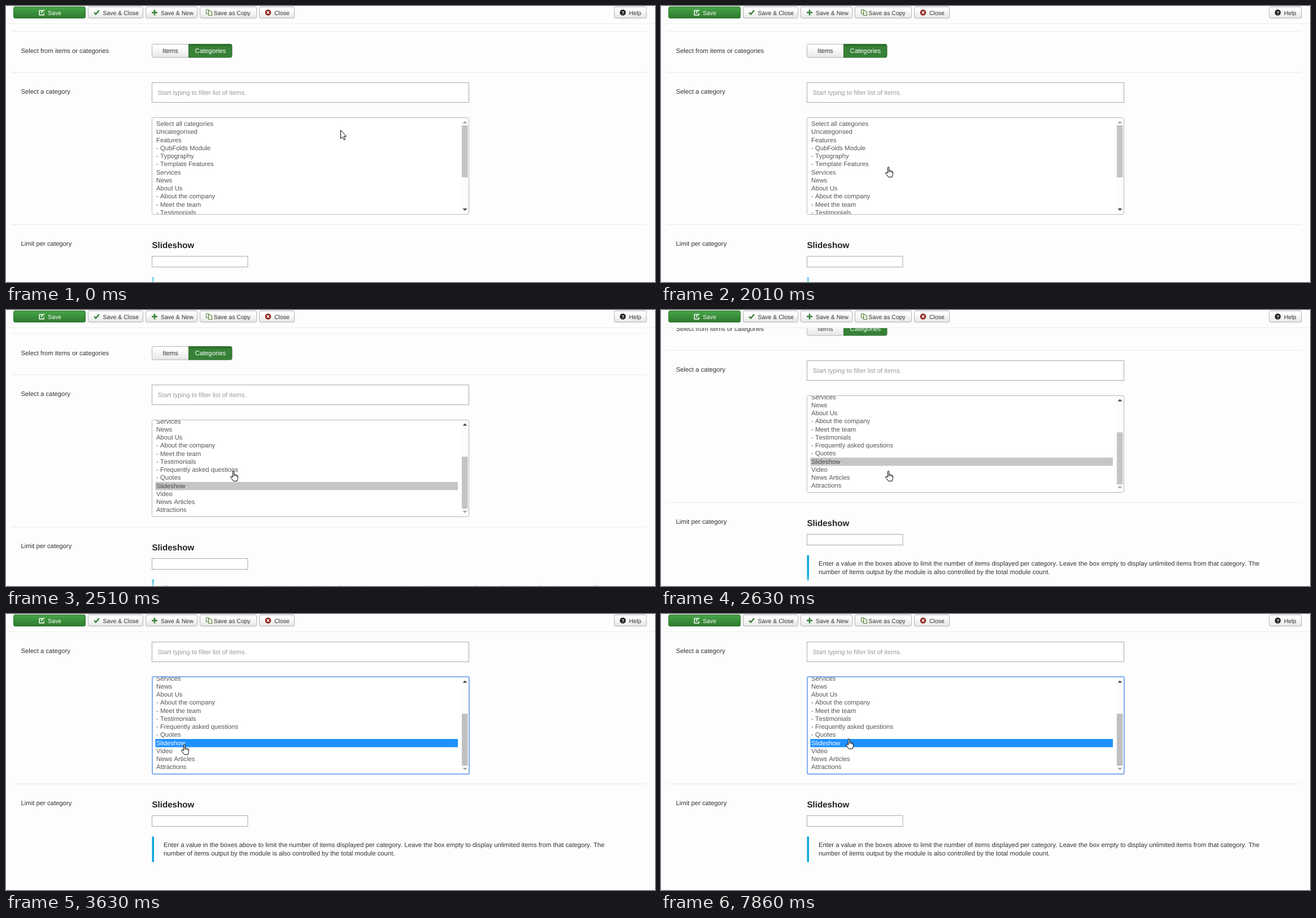
An HTML page for the animation above (8 s loop, 1149 px wide and 488 px high).

```html
<!DOCTYPE html>
<html lang="en">
<head>
<meta charset="utf-8">
<title>Category picker</title>
<style>
html, body { margin: 0; width: 100%; height: 100%; overflow: hidden; background: #fdfdfd; }
svg { display: block; }
#stage { width: 100vw; height: 100vh; }
text { font: 11.3px "Liberation Sans", Arial, sans-serif; font-kerning: none; fill: #333; text-rendering: geometricPrecision; white-space: pre; }
.small text { font-size: 10.5px; }
text.heading { font-size: 15.1px; font-weight: bold; fill: #222; }
text.hint { fill: #999; }
text.white { fill: #fff; }
.rule { stroke: #e8e8e8; }
.field { fill: #fff; stroke: #a9a9a9; }
.button { fill: url(#plain); stroke: #b3b3b3; }
#rows text { fill: #555; }
#rows .chosen { fill: #444; }
.focus #rows .chosen { fill: #fff; }
#mark { fill: #c6c6c6; }
.focus #mark { fill: #1e90ff; }
#frame { fill: none; stroke: #b8b8b8; }
.focus #frame { x: 259px; y: 197px; height: 172px; stroke: #82adec; stroke-width: 2; }
#thumb { fill: #c4c4c4; }
.focus #thumb { fill: #c0c0c0; }
.cursor { fill: #fff; stroke: #000; stroke-linejoin: round; }
</style>
</head>
<body>
<svg id="stage" viewBox="0 0 1149 488" preserveAspectRatio="none">
  <defs>
    <linearGradient id="plain" x2="0" y2="1"><stop offset=".2" stop-color="#fff"/><stop offset="1" stop-color="#e6e6e6"/></linearGradient>
    <linearGradient id="leaf" x2="0" y2="1"><stop stop-color="#46a546"/><stop offset="1" stop-color="#2f7a2f"/></linearGradient>
    <linearGradient id="pressed" x2="0" y2="1"><stop stop-color="#2b672b"/><stop offset=".22" stop-color="#378137"/></linearGradient>
    <linearGradient id="haze" x2="0" y2="1"><stop stop-color="#fdfdfd" stop-opacity="0"/><stop offset="1" stop-color="#fdfdfd" stop-opacity=".65"/></linearGradient>
  </defs>
  <rect width="1149" height="488" fill="#fdfdfd"/>

  <g id="page">
    <path class="rule" d="M10 44.5H1134M10 117.5H1134M10 386.5H1134"/>
    <text x="26.5" y="82.5">Select from items or categories</text>
    <path class="button" d="M324 67.5H261.5a3 3 0 0 0-3 3V88a3 3 0 0 0 3 3H324Z"/>
    <path d="M323.5 67.5H397a3 3 0 0 1 3 3V88a3 3 0 0 1-3 3H323.5Z" fill="url(#pressed)" stroke="#2d6a2d"/>
    <text x="277" y="82.5">Items</text>
    <text class="white" x="334.5" y="82.5">Categories</text>

    <g id="section">
      <text x="26.5" y="155">Select a category</text>
      <rect class="field" x="258.5" y="135.5" width="561" height="35"/>
      <text class="hint" x="268.5" y="157">Start typing to filter list of items.</text>
      <rect x="258.5" y="197.5" width="561" height="171" fill="#fff"/>
      <rect id="track" x="806" y="198" width="13" height="170"/>
      <svg x="259" y="198" width="560" height="170" viewBox="259 198 560 170">
        <g id="rows"><rect id="mark" x="264.5" y="401" width="535.5" height="14.5"/></g>
        <rect id="thumb" x="807" y="211" width="10.5" height="92"/>
        <path id="up" d="M808.5 207.5h8l-4-4Z"/>
        <path id="down" d="M808.5 358h8l-4 4Z"/>
      </svg>
      <rect id="frame" x="258.5" y="197.5" width="561" height="171" rx="2"/>
    </g>

    <text x="26.5" y="424">Limit per category</text>
    <text class="heading" x="258.5" y="427.5">Slideshow</text>
    <rect class="field" x="258.5" y="442.5" width="169.5" height="19"/>
    <rect x="258.5" y="479.5" width="3.5" height="45" fill="#08a6de"/>
    <text x="279" y="498">Enter a value in the boxes above to limit the number of items displayed per category. Leave the box empty to display unlimited items from that category. The</text>
    <text x="279" y="513">number of items output by the module is also controlled by the total module count.</text>
  </g>
  <rect y="466" width="1149" height="22" fill="url(#haze)"/>

  <g class="small" id="toolbar">
    <rect width="1149" height="31" fill="#fdfdfd"/>
    <path d="M0 31.5H1149" stroke="#ececec"/>
    <rect x="13.5" y="1.5" width="127" height="20" rx="2.5" fill="url(#leaf)" stroke="#2f742f"/>
    <path d="M65 8H59.2V16H67V12.5M62.5 13l.5-2 5-4.5" fill="none" stroke="#fff" stroke-width="1.5"/>
    <text class="white" x="74" y="15.5">Save</text>
    <g fill="none" stroke="#378137">
      <path d="M156 11.5l3 3 6-7" stroke-width="2.4"/>
      <path d="M263 6.5v10M258 11.5h10" stroke-width="2.6"/>
      <path d="M358 13.5h-3.5V6.5h3.5l2 2M358.5 8.5h3.5l2.5 2.5v5.5h-6Z" stroke="#5a8a3c" stroke-width="1.2"/>
    </g>
    <circle cx="464" cy="11.5" r="5.3" fill="#942a25"/>
    <path d="M462 9.5l4 4m0-4l-4 4" stroke="#fff" stroke-width="1.5"/>
    <circle cx="1092" cy="11.5" r="5.3" fill="#222"/>
    <text class="white" x="1089.8" y="14.5" style="font-size:8px;font-weight:bold">?</text>
  </g>

  <path id="arrow" class="cursor" d="M.5 .5V15.7L4 12.4 6.4 17.8 8.6 16.8 6.3 11.5H10.5Z"/>
  <g id="hand" class="cursor">
    <path d="M4.5 11.5V2Q4.5 .6 5.7 .6T6.9 2V6.8Q9 6 9.4 7.6 11.2 7 11.6 8.5 13.5 8.2 13.5 10V13.5L12.2 18.4H5.5L1 12Q.2 10 2 10Z"/>
    <path fill="none" d="M6.9 6.8V10M9.4 7.6V10M11.6 8.5V10.5"/>
  </g>
  <path id="beam" class="cursor" d="M.5 .5H2.5L3.5 1.5 4.5 .5H6.5M3.5 1.5V15M.5 16H2.5L3.5 15 4.5 16H6.5" style="fill:none"/>
</svg>
<script>
const $ = id => document.getElementById(id);
const LOOP = 8000, ROW = 14.25;

function add(parent, tag, attrs, label = '') {
  const node = document.createElementNS('http://www.w3.org/2000/svg', tag);
  for (const key in attrs) node.setAttribute(key, attrs[key]);
  node.textContent = label;
  parent.append(node);
  return node;
}

const options = ['Select all categories', 'Uncategorised', 'Features', '- QubFolds Module',
  '- Typography', '- Template Features', 'Services', 'News', 'About Us',
  '- About the company', '- Meet the team', '- Testimonials',
  '- Frequently asked questions', '- Quotes', 'Slideshow', 'Video', 'News Articles', 'Attractions'];
options.forEach((label, i) => add($('rows'), 'text',
  { x: 266, y: 212 + i * ROW, class: label === 'Slideshow' ? 'chosen' : '' }, label));

const buttons = [[145.5, 97, 171.5, 'Save & Close'], [247.5, 91, 274, 'Save & New'],
  [343.5, 100, 367.5, 'Save as Copy'], [448.5, 62, 475, 'Close'], [1077, 57, 1103, 'Help']];
for (const [x, width, textX, label] of buttons) {
  const box = add($('toolbar'), 'rect', { class: 'button', x, y: 1.5, width, height: 20, rx: 2.5 });
  $('toolbar').insertBefore(box, $('toolbar').children[2]);
  add($('toolbar'), 'text', { x: textX, y: 15.5 }, label);
}

// time, cursor shape, left, top
const cursorSteps = [
  [0, 'arrow', 592, 219], [150, 'hand', 587, 218], [320, 'arrow', 420, 129], [450, 'arrow', 363, 101],
  [600, 'hand', 353, 90], [730, 'hand', 354, 87], [870, 'hand', 354, 84], [1280, 'arrow', 359, 119],
  [1430, 'beam', 358, 143], [1590, 'hand', 369, 198], [1730, 'hand', 379, 234], [1860, 'hand', 387, 263],
  [2010, 'hand', 397, 284], [2750, 'arrow', 401, 285], [2910, 'arrow', 399, 283], [3060, 'hand', 319, 235],
  [3200, 'hand', 313, 232], [3330, 'hand', 310, 230], [4180, 'hand', 280, 228], [4310, 'hand', 252, 225],
  [4450, 'hand', 329, 229], [4580, 'hand', 269, 224], [4730, 'hand', 325, 224], [4870, 'hand', 347, 227],
  [5000, 'hand', 295, 224], [5150, 'hand', 334, 224], [7860, 'hand', 327, 220]];
const listSteps = [[0, 0], [2150, 30], [2270, 75], [2390, 94]];
const pageSteps = [[0, 0], [2510, 3], [2630, 46], [2750, 86]];

const at = (steps, t) => steps.findLast(step => step[0] <= t);
const move = (id, x, y) => $(id).setAttribute('transform', `translate(${x} ${y})`);

function draw() {
  const t = performance.now() % LOOP;
  const [, shape, x, y] = at(cursorSteps, t);
  for (const id of ['arrow', 'hand', 'beam']) $(id).style.display = id === shape ? '' : 'none';
  move(shape, x, y);

  const scroll = at(listSteps, t)[1];
  move('rows', 0, -scroll);
  move('thumb', 0, scroll * 0.546);
  $('up').style.fill = scroll ? '#444' : '#a3a3a3';
  $('down').style.fill = scroll < 94 ? '#444' : '#a3a3a3';
  move('page', 0, -at(pageSteps, t)[1]);

  const fading = t >= 1280 && t < 1430;
  $('section').style.opacity = fading ? 0.65 : 1;
  $('track').style.fill = fading ? '#f1f1f1' : '#fcfcfc';
  $('section').classList.toggle('focus', t >= 3630);
  requestAnimationFrame(draw);
}
draw();
</script>
</body>
</html>
```
